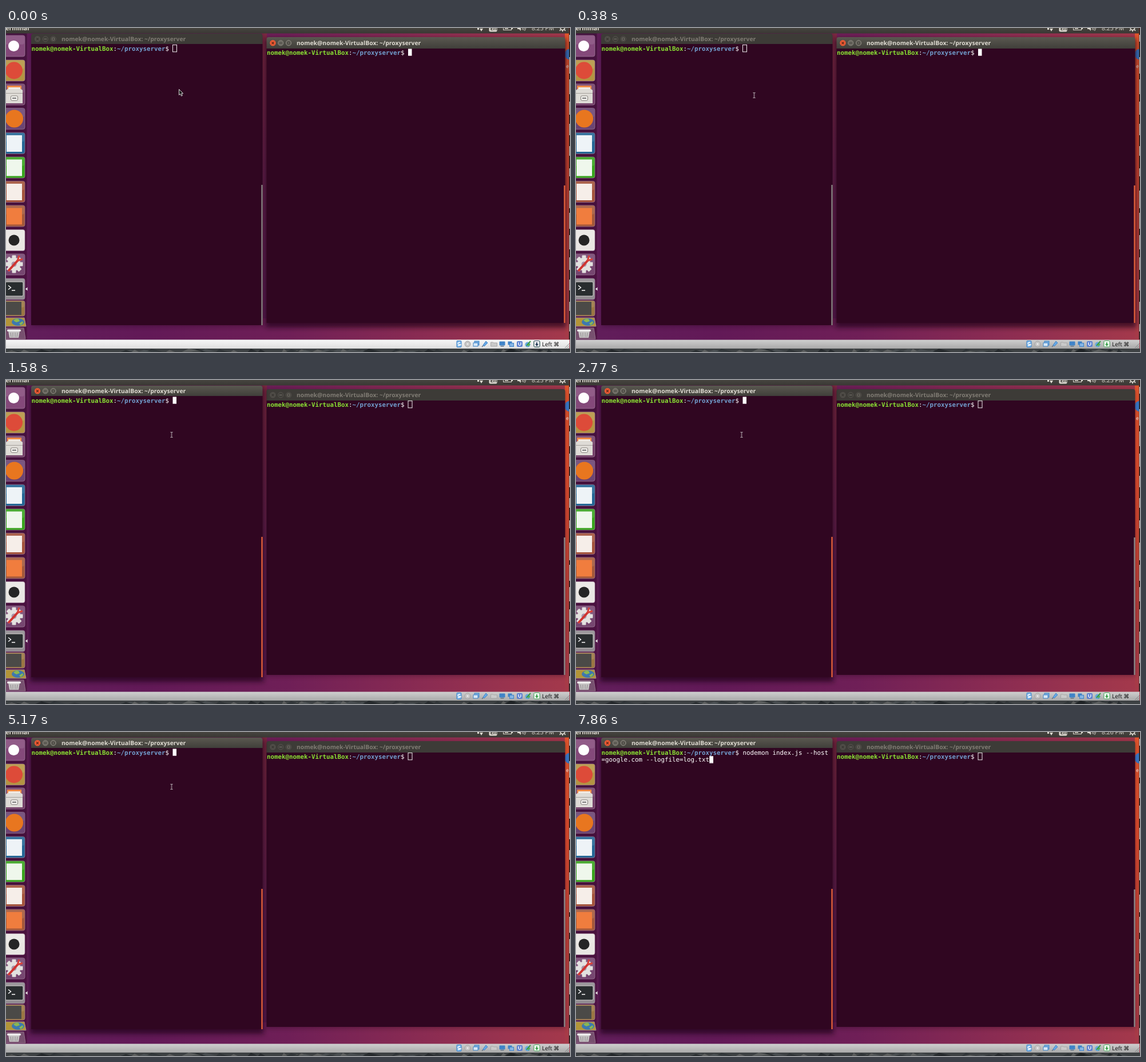
These frames come from a looping animation (986x568 px, 8 s). An HTML page:

```html
<!DOCTYPE html>
<html lang="en">
<head>
<meta charset="utf-8">
<title>Proxy server terminals</title>
<style>
html, body { margin: 0; width: 100%; height: 100%; overflow: hidden; background: #300621; }
svg { display: block; width: 986px; height: 568px; text-rendering: geometricPrecision; }
text { white-space: pre; }
.ui { font-family: "Open Sans", "Noto Sans", sans-serif; font-weight: 700; }
.light { font-weight: 400; }
.mono { font: 10.8px "DejaVu Sans Mono", monospace; fill: #fff; }
.user { fill: #8ae234; font-weight: 700; }
.path { fill: #729fcf; font-weight: 700; }
.step { animation: 8s step-end infinite; }

.pale { animation-name: pale; }
.before { animation-name: before; }
.after { animation-name: after; }
.arrow { animation-name: arrow; }
.beam { animation-name: beam; }
.blink { animation-name: blink; }
.first { animation-name: first; }
.full { animation-name: full; }
.old { animation-name: old; }
.new { animation-name: new; }

@keyframes pale { 0% { opacity: 1 } 4.75%, 100% { opacity: 0 } }
@keyframes before { 0% { opacity: 1 } 7%, 100% { opacity: 0 } }
@keyframes after { 0% { opacity: 0 } 7%, 100% { opacity: 1 } }
@keyframes arrow { 0% { opacity: 1 } 1.875%, 100% { opacity: 0 } }
@keyframes beam {
  0% { opacity: 0; transform: translate(311.5px, 118px) }
  1.875% { opacity: 1; transform: translate(311.5px, 118px) }
  11.125% { opacity: 1; transform: translate(292.5px, 99px) }
  14.125% { opacity: 1; transform: translate(289.5px, 96px) }
  83.375%, 100% { opacity: 0; transform: translate(289.5px, 96px) }
}
@keyframes blink {
  0% { opacity: 0; transform: none }
  7%, 19.75%, 34.625%, 49.625%, 64.625%, 79.625% { opacity: 1; transform: none }
  11.125%, 27.125%, 42.125%, 57.125%, 72.125% { opacity: 0; transform: none }
  85.25% { opacity: 1; transform: translate(32.5px, 0) }
  92.75% { opacity: 0; transform: translate(32.5px, 0) }
  98.25%, 100% { opacity: 1; transform: translate(-58.5px, 12.5px) }
}
@keyframes first { 0% { opacity: 0 } 85.25% { opacity: 1 } 98.25%, 100% { opacity: 0 } }
@keyframes full { 0% { opacity: 0 } 98.25%, 100% { opacity: 1 } }
@keyframes old { 0% { opacity: 1 } 96.5%, 100% { opacity: 0 } }
@keyframes new { 0% { opacity: 0 } 96.5%, 100% { opacity: 1 } }
</style>
</head>
<body>
<svg id="stage" viewBox="0 0 986 568" xmlns="http://www.w3.org/2000/svg"></svg>
<script>
const USER = 'nomek', HOST = USER + '-VirtualBox', DIR = '~/proxyserver';

const rect = (x, y, w, h, fill, more = '') =>
  `<rect x="${x}" y="${y}" width="${w}" height="${h}" fill="${fill}" ${more}/>`;
const circle = (x, y, r, fill, more = '') =>
  `<circle cx="${x}" cy="${y}" r="${r}" fill="${fill}" ${more}/>`;
const path = (d, fill, more = '') => `<path d="${d}" fill="${fill}" ${more}/>`;
const line = (d, color, width = 1) => path(d, 'none', `stroke="${color}" stroke-width="${width}"`);
const label = (x, y, size, fill, text, more = '', cls = '') =>
  `<text class="ui ${cls}" x="${x}" y="${y}" font-size="${size}" fill="${fill}" ${more}>${text}</text>`;
const code = (x, y, text) => `<text class="mono" x="${x}" y="${y}">${text}</text>`;
const group = (cls, body) => `<g class="step ${cls}">${body}</g>`;
const gradient = (id, dir, ...stops) =>
  `<linearGradient id="${id}" x1="0" y1="0" ${dir}="1" ${dir === 'y2' ? 'x2="0"' : 'y2="0"'}>` +
  stops.map((c, i) => `<stop offset="${i / (stops.length - 1)}" stop-color="${c}"/>`).join('') +
  '</linearGradient>';

const left = { x: 44, y: 10, w: 404.5, h: 511, bar: 18, titleX: 97, titleY: 23, buttonX: 55, textX: 44.5, textY: 39.5, thumb: 275 };
const right = { x: 455.5, y: 16, w: 522, h: 501, bar: 20, titleX: 508, titleY: 30.3, buttonX: 466.5, textX: 456, textY: 46.5, thumb: 276 };

function frame(win, focused) {
  const { x, y, w, h, bar } = win;
  const cy = y + bar / 2 + 0.3, [a, b, c] = [0, 13.8, 27.6].map(d => win.buttonX + d);
  const dim = focused ? '#85827a' : '#56534e', face = focused ? '#6d6a62' : '#403e3a';
  return (focused ? rect(x - 2, y + 3, w + 4, h + 5, '#1b0415', 'opacity=".7" filter="url(#soft)"')
                  : rect(x, y + 1, w, h + 1, '#1b0415', 'opacity=".35" filter="url(#soft)"')) +
    path(`M${x} ${y + bar}v${4 - bar}q0-4 4-4h${w - 8}q4 0 4 4v${bar - 4}z`, focused ? 'url(#title)' : '#3d3b37') +
    rect(x, y + bar, w, h - bar, '#300621') +
    circle(a, cy, 5.2, focused ? '#ea5a34' : '#504d48') +
    circle(b, cy, 4.7, face, `stroke="${dim}"`) + circle(c, cy, 4.7, face, `stroke="${dim}"`) +
    line(`M${a - 2} ${cy - 2}l4 4m0-4l-4 4`, focused ? '#5a2415' : '#35332f', 1.2) +
    line(`M${b - 2.5} ${cy}h5M${c - 2} ${cy - 2}h4v4h-4z`, focused ? '#3b3934' : '#7a766e') +
    label(win.titleX, win.titleY, 10.4, focused ? '#dfdbd2' : '#807c74', `${USER}@${HOST}: ${DIR}`) +
    rect(x + w - 2.2, win.thumb, 2.4, y + h - win.thumb, focused ? '#e2603a' : '#8d8988');
}

const prompt = win => code(win.textX, win.textY,
  `<tspan class="user">${USER}@${HOST}</tspan>:<tspan class="path">${DIR}</tspan>$ `);
const block = win => rect(win.textX + 247, win.textY - 10, 6.5, 12.2, '#fff');
const hollow = win => rect(win.textX + 247, win.textY - 9.9, 7, 12.2, 'none', 'stroke="#eee"');

function tile(y, fill, body, h = 37) {
  return rect(-6, y - h / 2, 39, h, fill, 'rx="3.5" stroke="#a98aa4" stroke-opacity=".6"') +
    rect(-6, y - h / 2 + 1, 38, h * 0.4, '#fff', 'opacity=".1" rx="3"') + body;
}

function launcher() {
  const square = (y, fill) => rect(1, y - 14, 27, 29, fill);
  let gear = '';
  for (let i = 0; i < 4; i++)
    gear += rect(10.5, 398.5, 7, 31, '#e3e1df', `rx="1" transform="rotate(${i * 45} 14 414)"`);
  return rect(0, 9, 37.5, 537, 'url(#dock)') + rect(36.5, 9, 1, 537, '#7a3c70', 'opacity=".4"') +
    tile(31.5, '#84497a', circle(13.5, 31.5, 9.5, '#fff')) +
    tile(74.5, '#b49443', circle(14, 74.5, 15, '#dd4b39')) +
    tile(116.5, '#744069',
      rect(2, 101, 25, 9, '#ef8a45') + rect(4, 104, 21, 5, '#f3ebe2') +
      path('M0 109L3 107H26L29 109V132H0z', '#dedbd6') + rect(0, 114, 29, 1, '#a5a19c') +
      rect(8.5, 119, 12, 8, '#f5f3f0', 'rx="2" stroke="#817e79"') + rect(11, 122, 7, 2, '#777')) +
    tile(159, '#6b4473', circle(14.5, 159, 15.5, '#e8761f')) +
    tile(202, '#246695', square(202, '#eef3f7')) +
    tile(244.5, '#37a31c', square(244.5, '#eff7ec')) +
    tile(287, '#a4533b', square(287, '#f6eee9')) +
    tile(329.5, '#a3583a', square(329.5, '#f07d3e')) +
    tile(372, '#e9e6e3', circle(14, 372, 9.5, '#252525')) +
    tile(414.5, '#764670',
      gear + circle(14, 414, 11.5, '#e3e1df') + circle(14, 414, 4.5, '#a892a5') +
      line('M4 426L21 407', '#cf3430', 4) + line('M20 408L29 405M20 408L23 399', '#d8403a', 3)) +
    tile(457.5, '#918c91',
      rect(-1, 445, 31, 25, '#292d2f', 'rx="2" stroke="#d4d2d0"') +
      line('M4 451.5l4.500 3.500-4.500 3.500M10 460h6', '#fff', 1.4)) +
    path('M34 457.5l3.5-3v6z', '#eee') +
    tile(491.5, '#9b7643', rect(0, 480, 27, 23, '#4b4a47'), 27) +
    path('M-5 508H32L35 523H-5z', '#b39538', 'stroke="#9e8797"') +
    '<ellipse cx="21" cy="515.5" rx="11" ry="6.5" fill="#3d78b0"/>' +
    path('M13 513q4-5 9-3l2 4-6 2zM23 518l6-4 1 3-4 4z', '#8bb850') +
    path('M-5 526H31L34 545H-5z', '#77506f', 'stroke="#927189"') +
    path('M4 531H24L22 543H6z', '#c7c5c5') + rect(2, 528.5, 24, 3.5, '#eeeded', 'rx="1.5"') +
    line('M8 534l1 8M12 534v8M16 534v8M20 534l-1 8', '#8b878a');
}

function panel() {
  const ink = '#dfdbd2';
  const clock = time => label(919, 3.7, 10.5, ink, time, '', 'light');
  return rect(0, 0, 984, 9.5, 'url(#panel)') +
    label(40.5, 3.6, 10.6, ink, 'Terminal', 'text-anchor="end"') +
    path('M824 0h3v3h-3zM828 1h6l-3 5z', ink) +
    rect(844.5, -7, 14, 13.5, ink, 'rx="2"') + label(846.5, 3.7, 9.5, '#3c3b37', 'En') +
    rect(869.5, -4, 14, 7.5, 'none', `stroke="${ink}"`) + rect(884, -1, 2, 3, ink) + rect(872, -2, 6, 3.5, ink) +
    path('M894 -2h3l3-3V5l-3-3h-3z', ink) + line('M902 3q2-2 1-5M904 4q3-3 2-6M906.5 5q3-4 2-7', ink) +
    group('old', clock('8:25 PM')) + group('new', clock('8:26 PM')) +
    circle(973, 0, 3.7, 'none', `stroke="${ink}" stroke-width="1.8"`) +
    line('M969.5 3l-1.5 2M973 4v2.5M976.5 3l1.5 2', ink, 1.6);
}

function edge() {
  let out = rect(984.3, 0, 1.7, 546, '#262020');
  for (let i = 0; i < 14; i++)
    out += rect(984.8, 12 + i * 39, 1.2, 12 + (i * 17) % 20, '#d9d5d3');
  return circle(986, 46, 9.5, '#3978c8') + label(979, 70, 8.5, '#fff', 'e C', '', 'light') + out;
}

function statusBar() {
  const blue = '#3f83c8';
  const at = (x, body) => `<g transform="translate(${x} 554)">${body}</g>`;
  const down = color => at(928, rect(-5, -5.5, 10, 10.5, '#fff', `rx="1.5" stroke="${color}"`) +
    path('M-1-3h2v3h2l-3 4-3-4h2z', color));
  return rect(0, 546.6, 985, 15.4, 'url(#host)') +
    group('pale', rect(0, 546.6, 985, 15.4, 'url(#hostPale)')) +
    at(792, rect(-4, -5.5, 8, 11, '#7db6e8', `rx="1" stroke="${blue}"`) + line('M2-3q-4 0-4 2t4 2-4 2', '#fff', 1.3)) +
    at(807, circle(0, 0, 5, '#c6c6c6', 'stroke="#a3a3a3"') + circle(0, 0, 1.5, '#eee')) +
    at(822, rect(-3, -5, 8, 7, '#77aee0', `stroke="${blue}"`) + rect(-5, -2, 8, 6, '#d7e8f7', `stroke="${blue}"`)) +
    at(837, line('M-5 5L2-2', '#617181', 1.5) + path('M-3 2L2-5 5-2-1 4z', '#69a9e4', `stroke="${blue}"`)) +
    at(852.5, path('M-5-3h4l1 1h6v6H-5z', '#c9c9c9', 'stroke="#a7a7a7"')) +
    at(867.5, rect(-5, -4.5, 10, 7, blue, 'rx="1"') + rect(-3, 3, 6, 1.5, '#607489')) +
    at(882.5, rect(-5, -4.5, 7, 6, blue) + rect(-2, -1.5, 7, 6, '#86b5e4', `stroke="${blue}"`)) +
    at(898, rect(-5, -5, 10, 10, '#5b7fd0', 'rx="2"') + line('M-2-3v4q2 3 4 0v-4', '#fff', 1.3)) +
    at(913, circle(-1, 1, 4.5, '#64a7df') + line('M-3 3L4-5', '#3d9c43', 2) + path('M0 0h4l-4 5z', '#54b447')) +
    down('#3ba14c') + group('pale', down('#223a55')) +
    label(937, 557.7, 10, '#111', 'Left ⌘', '', 'light') +
    line('M977 561l8-8M980 561.5l5-5M983 562l2-2', '#777', 0.8);
}

function rocks() {
  let seed = 7, out = rect(0, 562, 986, 6, '#3d4143');
  const rnd = () => (seed = seed * 16807 % 2147483647) / 2147483647;
  const tones = ['#1d2124', '#4d5356', '#2b3033', '#696b6a'];
  for (let i = 0; i < 70; i++) {
    const x = rnd() * 986, w = 6 + rnd() * 18;
    out += path(`M${x} 568l${w / 2}-${2 + rnd() * 4} ${w} 5z`, tones[i % 4], 'opacity=".7"');
  }
  return out;
}

const defs = '<defs>' +
  gradient('wall', 'x2', '#611e5b', '#621957', '#6f1f57', '#8b2c52', '#a4394b') +
  gradient('warm', 'y2', '#e2552c', '#d94a2d', '#b73d37', '#a53a49') +
  gradient('gap', 'y2', '#7c2942', '#64204d', '#5c1b52') +
  gradient('dock', 'y2', '#46123f', '#46103b', '#4f1345') +
  gradient('title', 'y2', '#5a5850', '#403f3a') +
  gradient('panel', 'y2', '#46443f', '#3a3834') +
  gradient('host', 'y2', '#cfcfcf', '#a9a9a9') +
  gradient('hostPale', 'y2', '#f7f7f7', '#dedede') +
  '<filter id="soft" x="-5%" y="-5%" width="110%" height="110%"><feGaussianBlur stdDeviation="4"/></filter></defs>';

const lineStart = left.textX + 247;

document.getElementById('stage').innerHTML = defs +
  rect(0, 0, 986, 568, 'url(#wall)') + rect(977, 0, 9, 546, 'url(#warm)') + rect(448, 9, 8, 500, 'url(#gap)') +
  edge() +
  group('before', frame(left, false) + frame(right, true) + hollow(left) + block(right)) +
  group('after', frame(right, false) + frame(left, true) + hollow(right)) +
  prompt(left) + prompt(right) +
  group('first', code(lineStart, left.textY, 'nodem')) +
  group('full', code(lineStart, left.textY, 'nodemon index.js --host') +
    code(left.textX, left.textY + 12.5, '=google.com --logfile=log.txt')) +
  group('blink', block(left)) +
  launcher() + panel() + rocks() + statusBar() +
  group('arrow', path('M302.5 107.5v10l2.3-2 1.7 3.7 1.8-.8-1.6-3.6h3z', '#1a1a1a', 'stroke="#eee" stroke-width=".9"')) +
  group('beam', line('M-2-4.5h1.3l.7.6.7-.6H2M0-4V4M-2 4.5h1.3l.7-.6.7.6H2', '#ddd', 0.9));
</script>
</body>
</html>
```
